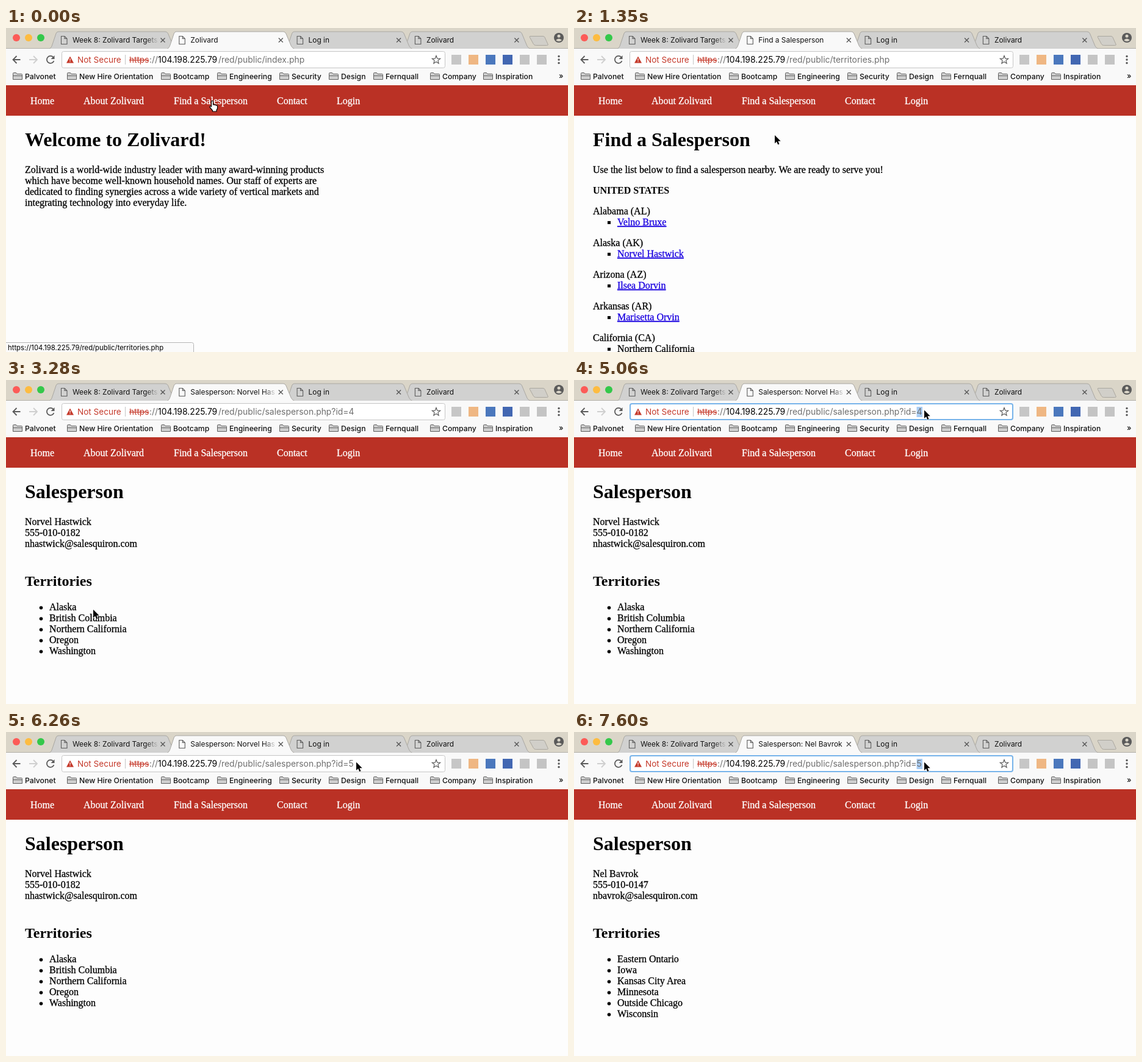
Animation of 921x532 px, one loop 8000 ms. Source, as an HTML page:

```html
<!DOCTYPE html>
<html lang="en">
<head>
<meta charset="utf-8">
<title>Browser session</title>
<style>
  html, body { margin: 0; width: 100%; height: 100%; overflow: hidden; background: #fdfdfd; }
  svg { display: block; width: 921px; height: 532px; }
  text { white-space: pre; }
  .tab { font: 11.9px Inter, sans-serif; fill: #111; }
  .mark { font: 500 12.2px Inter, sans-serif; fill: #111; }
  .url { font: 13.9px Inter, sans-serif; fill: #6e6e6e; }
  .small { font: 11.3px Inter, sans-serif; fill: #000; }
  .body, .nav, .link { font: 16px "Liberation Serif", serif; fill: #000; stroke: #000; stroke-width: .3px; }
  .nav { fill: #fff; stroke: #fff; }
  .link { fill: #1a00e0; stroke: #1a00e0; text-decoration: underline; }
  .strong { font: bold 16px "Liberation Serif", serif; }
  .h1 { font: bold 32px "Liberation Serif", serif; }
  .h2 { font: bold 24px "Liberation Serif", serif; }
  .black { fill: #000; }
  .red, .strike { font-size: 13.55px; fill: #c5392a; }
  .strike { text-decoration: line-through; }
  .pick { font-size: 14.3px; font-weight: 700; fill: #3367d6; }
</style>
</head>
<body>
<svg id="stage" viewBox="0 0 921 532"></svg>
<script>
const LOOP = 8000;
const HOST = '104.198.225.79';
const DIR = '/red/public/';

const text = (x, y, s, cls, attrs = '') => `<text x="${x}" y="${y}" class="${cls}" ${attrs}>${s}</text>`;
const rect = (x, y, w, h, fill, attrs = '') => `<rect x="${x}" y="${y}" width="${w}" height="${h}" fill="${fill}" ${attrs}/>`;
const path = (d, attrs) => `<path d="${d}" ${attrs}/>`;
const line = (d, color, width = 1) => path(d, `fill="none" stroke="${color}" stroke-width="${width}"`);
const group = (id, content) => `<g id="${id}">${content}</g>`;
const lines = (rows, y, x = 31) => rows.map((s, i) => text(x, y + 18 * i, s, 'body')).join('');
const docIcon = (x, y) => line(`M${x + .5} ${y + .5}h5.5l4 4v9h-9.5zm5.5 0v4h4`, '#5c5c5c', 1.1);

// Web pages
const welcome = text(31, 194, 'Welcome to Zolivard!', 'h1') + lines([
  'Zolivard is a world-wide industry leader with many award-winning products',
  'which have become well-known household names. Our staff of experts are',
  'dedicated to finding synergies across a wide variety of vertical markets and',
  'integrating technology into everyday life.'], 238);

const sellers = [['Alabama (AL)', 'Velno Bruxe'], ['Alaska (AK)', 'Norvel Hastwick'],
  ['Arizona (AZ)', 'Ilsea Dorvin'], ['Arkansas (AR)', 'Marisetta Orvin'],
  ['California (CA)', 'Northern California']];
const directory = text(31, 194, 'Find a Salesperson', 'h1')
  + text(31, 238, 'Use the list below to find a salesperson nearby. We are ready to serve you!', 'body')
  + text(31, 272, 'UNITED STATES', 'strong')
  + sellers.map(([state, name], i) => {
    const y = 306 + 52 * i;
    return text(31, y, state, 'body') + rect(55, y + 11, 5, 5, '#000')
      + text(71, y + 18, name, i < 4 ? 'link' : 'body');
  }).join('');

const profile = (contact, areas) => text(31, 194, 'Salesperson', 'h1') + lines(contact, 238)
  + text(31, 338, 'Territories', 'h2') + lines(areas, 378, 71)
  + areas.map((_, i) => `<circle cx="57.5" cy="${374 + 18 * i}" r="2.8"/>`).join('');

const pages = [
  { title: 'Zolivard', content: welcome },
  { title: 'Find a Salesperson', content: directory },
  { title: 'Salesperson: Norvel Has', fade: true, content: profile(
    ['Norvel Hastwick', '555-010-0182', 'nhastwick@salesquiron.com'],
    ['Alaska', 'British Columbia', 'Northern California', 'Oregon', 'Washington']) },
  { title: 'Salesperson: Nel Bavrok', content: profile(
    ['Nel Bavrok', '555-010-0147', 'nbavrok@salesquiron.com'],
    ['Eastern Ontario', 'Iowa', 'Kansas City Area', 'Minnesota', 'Outside Chicago', 'Wisconsin']) },
];

const nav = rect(0, 94, 921, 50, '#ba3125')
  + [[40, 'Home'], [127, 'About Zolivard'], [275, 'Find a Salesperson'], [444, 'Contact'], [542, 'Login']]
    .map(([x, s]) => text(x, 125, s, 'nav')).join('');

// Browser window
function tab(i, title, active) {
  const d = 'M0 34C3 33 4 30 5 27L11 9Q12 6 15 6H190Q193 6 194.500 9L202 27C203 30 205 33 208 34';
  const attrs = `fill="${active ? '#f9f9f9' : '#d1d1d0'}" stroke="#a9a7a2"`;
  return `<g transform="translate(${71 + 193.3 * i} 0)">${path(d, attrs)}${docIcon(19, 13)}`
    + text(38, 24, title, 'tab', active ? 'id="title"' : i ? '' : 'style="fill:url(#fade)"')
    + line('M182.500 16.500l7 7m0-7l-7 7', '#555', 1.3) + '</g>';
}

const lights = ['#fc5b57', '#fdbc40', '#34c84a']
  .map((c, i) => `<circle cx="${17 + 20 * i}" cy="16" r="6" fill="${c}"/>`).join('');

const avatar = '<circle cx="906" cy="16" r="8" fill="#5a5a5a"/><circle cx="906" cy="13.3" r="2.5" fill="#dad5c8"/>'
  + path('M901 20q5-5 10 0-5 4-10 0z', 'fill="#dad5c8"');

const tabStrip = rect(0, 0, 921, 34, '#dad5c8') + lights
  + path('M859 13.500h21q2 0 3 2l5 11q1 2-1.500 2h-18q-3 0-4-2l-6-11q-1-2 .5-2z', 'fill="#d1cfc9" stroke="#aaa79f"')
  + avatar + line('M0 33.500H921', '#b3b0a9')
  + tab(3, 'Zolivard') + tab(2, 'Log in') + tab(0, 'Week 8: Zolivard Targets') + tab(1, '', true);

const buttons = line('M23.500 52H11.500m6-6l-6 6 6 6', '#5a5a5a', 1.8)
  + line('M38 52H51m-6-6l6 6-6 6', '#cfcfcf', 1.8)
  + line('M77.500 48A6 6 0 1 0 78.500 54', '#5a5a5a', 1.8) + path('M79.500 45v6h-6z', 'fill="#5a5a5a"')
  + ['#c6c6c6', '#efb783', '#4b78bd', '#4267b2', '#c4c4c4', '#c4c4c4']
    .map((c, i) => rect(730 + 28 * i, 44, 16, 16, c)).join('')
  + [46.5, 52, 57.5].map(y => `<circle cx="906" cy="${y}" r="1.7" fill="#5a5a5a"/>`).join('');

const bookmarks = [[11, 'Palvonet'], [100, 'New Hire Orientation'], [254, 'Bootcamp'], [346, 'Engineering'],
  [448, 'Security'], [529, 'Design'], [602, 'Fernquall'], [695, 'Company'], [782, 'Inspiration']]
  .map(([x, s]) => path(`M${x + .5} 84.500v-10q0-1 1-1h4l1.500 2h7.500q1 0 1 1v8zm0-6h15`,
    'fill="#cfcfcf" stroke="#606060"') + text(x + 20, 84, s, 'mark')).join('');

const starPoints = Array.from({ length: 10 }, (_, i) => {
  const r = i % 2 ? 3 : 7, a = Math.PI * i / 5;
  return `${(705 + r * Math.sin(a)).toFixed(1)},${(52.5 - r * Math.cos(a)).toFixed(1)}`;
}).join(' ');

const address = rect(0, 0, 0, 0, '#fff', 'id="field" rx="3"')
  + group('settled', path('M105 46.500l6 11H99z', 'fill="#c5392a"') + rect(104.4, 50, 1.2, 3.6, '#fff')
    + rect(104.4, 54.6, 1.2, 1.2, '#fff') + text(117, 57, 'Not Secure', 'url red')
    + line('M195.500 44V60', '#c4c4c4') + text(202, 57, 'https', 'url strike') + text(235, 57, '://', 'url')
    + rect(0, 44, 9.5, 17, '#a9cdf4', 'id="selection"')
    + text(249, 57, HOST, 'url black') + text(348, 57, '', 'url', 'id="route"')
    + rect(0, 44, 1, 17, '#000', 'id="caret"')
    + `<polygon points="${starPoints}" fill="none" stroke="#5a5a5a" stroke-width="1.2"/>`);

const typedRoute = DIR + 'salesperson.php?id=5';
const typing = docIcon(100, 45)
  + text(118, 57, `https://<tspan class="black">${HOST}</tspan>${typedRoute}`, 'url', 'id="typed"')
  + rect(0, 45, 1, 16, '#000', 'id="typedCaret"')
  + rect(0, 70, 921, 59, '#fdfdfd') + line('M0 70.500H921', '#dedede')
  + rect(0, 75, 921, 25, '#ebebeb') + docIcon(100, 81)
  + text(118, 93, `<tspan class="pick">https://${HOST}${typedRoute}</tspan> - Salesperson: Nel Bavrok`, 'url')
  + '<circle cx="103.5" cy="111.5" r="3.8" fill="none" stroke="#777" stroke-width="1.5"/>'
  + line('M106.500 114.500l4 4', '#777', 1.6)
  + text(118, 118, `<tspan class="black">https://${HOST}${typedRoute}</tspan> - Tuvvy Search`, 'url');

const toolbar = rect(0, 34, 921, 60, '#f9f9f9') + buttons + bookmarks
  + text(906, 83, '»', 'mark') + address + group('typing', typing);

const bubble = path('M-1 516.500H304.500q3 0 3 3V533H-1z', 'fill="#fafafa" stroke="#b5b5b5"')
  + text(3, 529, '', 'small', 'id="status"');

const pointers = group('arrow', path('M0 0V13.500l3.100-2.900 2.100 4.800 2.300-1-2.100-4.600h4.300z',
    'fill="#000" stroke="#fff" stroke-width="1.2" paint-order="stroke"'))
  + group('hand', path('M-1.500 9V1a1.500 1.500 0 0 1 3 0V6q1.500-1 2.500.5 1.600-.8 2.500.6 2-.5 2 1.400v3.500l-1.500 3v2h-6.500v-1.500l-4.500-5.500q-.5-2 1.500-1.500z',
    'fill="#fff" stroke="#000" stroke-width="1.2"'))
  + group('beam', line('M-3-7.500q3 0 3 2 0-2 3-2M0-6V6M-3 7.500q3 0 3-2 0 2 3 2M-1.500 3h3', '#000', 1.1));

document.getElementById('stage').innerHTML =
  `<defs><linearGradient id="fade" gradientUnits="userSpaceOnUse" x1="158" x2="179" y1="0" y2="0">
    <stop stop-color="#111"/><stop offset="1" stop-color="#111" stop-opacity="0"/></linearGradient></defs>`
  + rect(0, 0, 921, 532, '#fdfdfd') + pages.map((p, i) => group('page' + i, p.content)).join('')
  + nav + tabStrip + toolbar + group('bubble', bubble) + group('pointer', pointers);

// Timelines: each row holds until the next one
const pageSteps = [[0, 0], [600, 1], [2980, 2], [6410, 3]];
const barSteps = [[0, 'index.php'], [600, 'territories.php'], [2980, 'salesperson.php?id=4'],
  [4920, 'salesperson.php?id=4', 'focus'], [5060, 'salesperson.php?id=4', 'select'],
  [5960, '', 'type'], [6260, 'salesperson.php?id=5'],
  [7450, 'salesperson.php?id=5', 'focus'], [7600, 'salesperson.php?id=5', 'select']];
const statusSteps = [[0, 'territories.php'], [1050, ''], [2090, 'salesperson.php?id=4'], [3130, '']];
const pointerSteps = [[0, 338, 120, 'hand'], [900, 338, 124, 'hand'], [1050, 338, 127, 'arrow'],
  [1200, 337, 128, 'arrow'], [1350, 329, 176, 'arrow'], [1500, 262, 300, 'arrow'], [1650, 214, 367, 'arrow'],
  [1940, 196, 368, 'arrow'], [2090, 176, 370, 'hand'], [2240, 158, 371, 'hand'], [2390, 147, 372, 'hand'],
  [2530, 143, 373, 'hand'], [2980, 143, 377, 'arrow'], [3430, 180, 352, 'arrow'], [3580, 240, 315, 'arrow'],
  [3730, 288, 291, 'arrow'], [4030, 350, 285, 'arrow'], [4180, 450, 262, 'arrow'], [4330, 530, 215, 'arrow'],
  [4480, 578, 160, 'arrow'], [4630, 596, 82, 'arrow'], [4770, 584, 52, 'beam'], [4920, 574, 52, 'beam'],
  [5060, 574, 49.5, 'arrow'], [6550, 574, 52, 'beam'], [7600, 574, 49.5, 'arrow']];

const $ = id => document.getElementById(id);
const show = (id, on) => { $(id).style.display = on ? '' : 'none'; };
const set = (id, attrs) => Object.entries(attrs).forEach(([name, value]) => $(id).setAttribute(name, value));
const at = (steps, t) => steps.findLast(row => row[0] <= t);

function drawField(focused) {
  const border = focused ? 2 : 1, inset = border / 2;
  set('field', {
    x: 91 + inset, y: 38 + inset, width: 629 - border, height: 28 - border,
    stroke: focused ? '#78b4ea' : '#c6c6c6', 'stroke-width': border,
  });
}

function render(t) {
  const [, page] = at(pageSteps, t);
  pages.forEach((_, i) => show('page' + i, i === page));
  $('title').textContent = pages[page].title;
  $('title').style.fill = pages[page].fade ? 'url(#fade)' : '';

  const [, file, mode] = at(barSteps, t);
  drawField(Boolean(mode));
  show('settled', mode !== 'type');
  show('typing', mode === 'type');
  show('selection', mode === 'select');
  show('caret', mode === 'focus');
  if (mode === 'type') {
    set('typedCaret', { x: 118 + $('typed').getComputedTextLength() });
  } else {
    const route = $('route');
    route.textContent = DIR + file;
    set('selection', { x: 348 + route.getSubStringLength(0, route.getNumberOfChars() - 1) });
    set('caret', { x: 348 + route.getComputedTextLength() });
  }

  const [, target] = at(statusSteps, t);
  show('bubble', target);
  $('status').textContent = `https://${HOST}${DIR}${target}`;

  const [, x, y, kind] = at(pointerSteps, t);
  set('pointer', { transform: `translate(${x} ${y})` });
  ['arrow', 'hand', 'beam'].forEach(id => show(id, id === kind));
}

const start = performance.now();
function tick() {
  render((performance.now() - start) % LOOP);
  requestAnimationFrame(tick);
}
tick();
</script>
</body>
</html>
```
